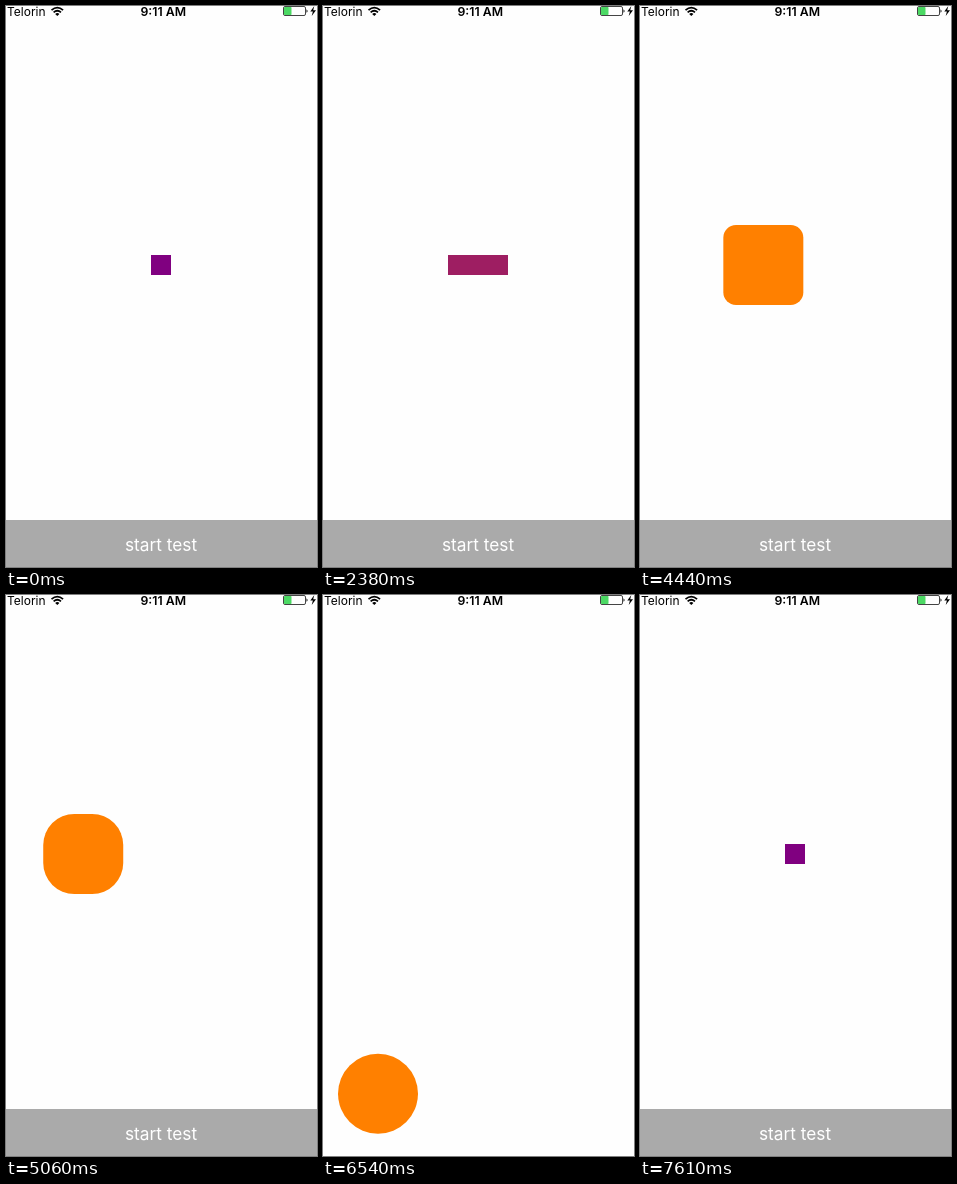
Recreate the animation shown at these times as an HTML page. Size 311 px wide and 561 px high, loop 9.29 s.

```html
<!DOCTYPE html>
<html lang="en">
<head>
<meta charset="utf-8">
<title>Chained view animation</title>
<style>
  html, body { margin: 0; width: 100%; height: 100%; overflow: hidden; background: #fefefe; }
  svg { display: block; width: 311px; height: 561px; font-family: Inter, Roboto, sans-serif; }
</style>
</head>
<body>
<svg viewBox="0 0 311 561">
  <g font-size="12">
    <text x="1" y="10">Telorin</text>
    <text x="157.3" y="10" font-size="12.3" font-weight="600" text-anchor="middle">9:11 AM</text>
  </g>
  <g fill="none" stroke="#000" stroke-width="1.7">
    <path d="M45.5 4.2Q51.3 -1 57.1 4.2M47.6 6.4Q51.3 3.1 55 6.4"/>
    <path d="M49.2 7.9Q51.3 6.1 53.4 7.9L51.3 10Z" fill="#000" stroke="none"/>
  </g>
  <rect x="277.5" y=".5" width="22" height="9" rx="1.5" fill="none" stroke="#444"/>
  <rect x="278" y="1" width="7.5" height="8" rx=".8" fill="#4cd964"/>
  <path d="M300.5 3.2Q302.6 5 300.5 6.8Z"/>
  <path d="M308.3 0L304.3 5.6H306.9L305.7 10L310 4.2H307.2Z"/>
  <g id="button">
    <rect width="311" height="50" fill="#aaa"/>
    <text x="155" y="31" font-size="17.3" fill="#fff" text-anchor="middle">start test</text>
  </g>
  <rect id="box"/>
</svg>
<script>
const LOOP = 9290, RESET = 7490;
const DROP = 5620, FIRST_HIT = 5830, SECOND_HIT = 6569, LAST_HIT = 7430;
const PURPLE = [128, 0, 128], PLUM = [158, 30, 98], ORANGE = [255, 128, 0];
const box = document.getElementById('box');
const button = document.getElementById('button');

const mix = (a, b, p) => a + (b - a) * p;
const mixColor = (a, b, p) => `rgb(${a.map((v, i) => Math.round(mix(v, b[i], p)))})`;
const progress = (t, start, end) => Math.min(1, Math.max(0, (t - start) / (end - start)));

// Parabolic flight between two heights; a negative rise dips below them.
const hop = (from, to, rise, p) => mix(from, to, p) - 4 * rise * p * (1 - p);

// Damped oscillation around `to`, released from rest at `start`.
function spring(t, start, from, to, period, decay) {
  const s = Math.max(0, t - start) / 1000;
  return to + (from - to) * Math.exp(-decay * s) * Math.cos(2 * Math.PI * s / period);
}

function draw(t) {
  if (t >= RESET) t = 0;

  const widen = progress(t, 1480, 2380);
  const grow = progress(t, 2460, 3430);
  const slide = progress(t, 4015, 5360);
  const drop = progress(t, DROP, FIRST_HIT);
  const bounce = progress(t, FIRST_HIT, SECOND_HIT);
  const rebound = progress(t, SECOND_HIT, LAST_HIT);

  const width = 20 + 40 * widen + 20 * grow;
  const height = t < 3580 ? spring(t, 2460, 20, 80, 0.555, 3.6) : 80;

  // The ball and the button knock each other apart at every hit.
  let top = 259 - height / 2 + 215 * drop ** 2;
  let buttonTop = 514;
  if (rebound > 0) {
    top = hop(478, 478, 170, rebound);
    buttonTop = hop(558, 558, -73, rebound);
  } else if (bounce > 0) {
    top = hop(434, 478, 121, bounce);
    buttonTop = hop(514, 558, -73, bounce);
  }

  const attrs = {
    x: 155 - width / 2 - 100 * slide,
    y: top,
    width,
    height,
    rx: 40 * slide,
    fill: grow > 0 ? mixColor(PLUM, ORANGE, grow) : mixColor(PURPLE, PLUM, widen)
  };
  for (const name in attrs) box.setAttribute(name, attrs[name]);
  button.setAttribute('transform', `translate(0 ${buttonTop})`);
}

const begin = performance.now();
function tick() {
  draw((performance.now() - begin) % LOOP);
  requestAnimationFrame(tick);
}
tick();
</script>
</body>
</html>
```
